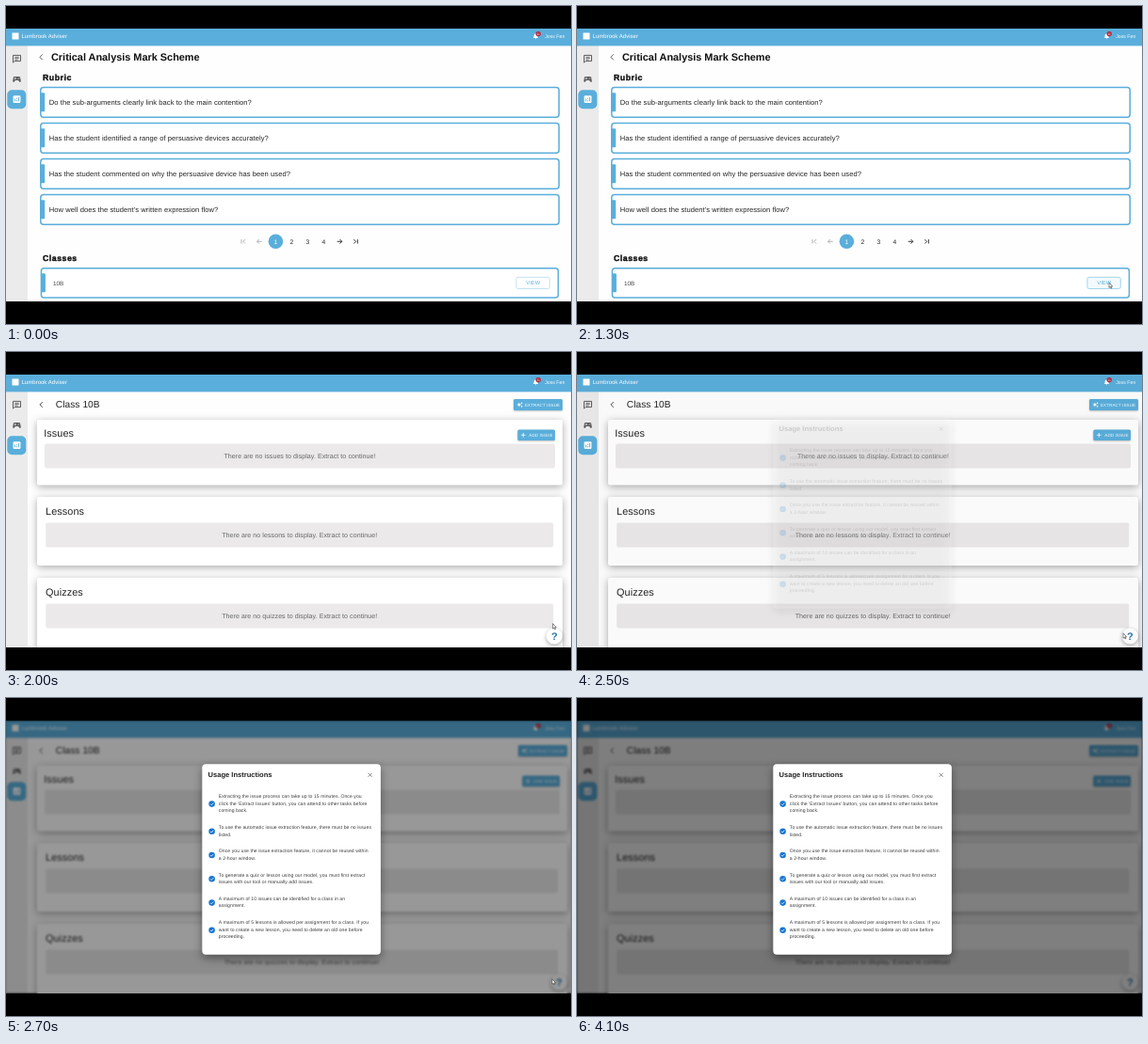
Animation of 600x338 px, one loop 5200 ms. Source, as an HTML page with a canvas:

```html
<!DOCTYPE html>
<html lang="en">
<head>
<meta charset="utf-8">
<title>Class assignment demo</title>
<style>
  html, body { margin: 0; width: 100%; height: 100%; overflow: hidden; background: #000; }
  canvas { display: block; width: 600px; height: 338px; }
</style>
</head>
<body>
<canvas id="stage"></canvas>
<script>
const W = 600, H = 338, LOOP = 5200, STEP = 100;
const TOP = 24, BOTTOM = 314;
const BLUE = '#5aaedb', INK = '#222';
const SANS = '"Liberation Sans", Arial, sans-serif';
const T = { load: 1400, ready: 1700, dialog: 2500, blur: 2700 };

const dpr = window.devicePixelRatio || 1;
function prepare(canvas) {
  canvas.width = W * dpr;
  canvas.height = H * dpr;
  return canvas.getContext('2d');
}
const stage = prepare(document.getElementById('stage'));
const layer = document.createElement('canvas');
const page = prepare(layer);
let c = page;

const clamp = v => Math.max(0, Math.min(1, v));
const ease = v => v * v * (3 - 2 * v);

function text(str, x, y, size, o = {}) {
  c.font = `${o.weight || 400} ${size}px ${SANS}`;
  c.textRendering = 'geometricPrecision';
  c.letterSpacing = (o.space || 0) + 'px';
  c.textAlign = o.align || 'left';
  c.fillStyle = o.color || INK;
  c.fillText(str, x, y);
  if (o.heavy) {
    c.strokeStyle = c.fillStyle;
    c.lineWidth = o.heavy;
    c.strokeText(str, x, y);
  }
}

function box(x, y, w, h, r, fill, stroke, line = 1) {
  c.beginPath();
  c.roundRect(x, y, w, h, r);
  if (fill) { c.fillStyle = fill; c.fill(); }
  if (stroke) { c.strokeStyle = stroke; c.lineWidth = line; c.stroke(); }
}

function disc(x, y, r, fill) {
  c.beginPath();
  c.arc(x, y, r, 0, Math.PI * 2);
  c.fillStyle = fill;
  c.fill();
}

// d is SVG path data relative to (x, y)
function path(x, y, d, stroke, line = 1, fill) {
  const p = new Path2D(d);
  c.save();
  c.translate(x, y);
  if (fill) { c.fillStyle = fill; c.fill(p); }
  if (stroke) { c.strokeStyle = stroke; c.lineWidth = line; c.stroke(p); }
  c.restore();
}

function shadowed(blur, dy, color, draw) {
  c.save();
  c.shadowColor = color;
  c.shadowBlur = blur * dpr;
  c.shadowOffsetY = dy * dpr;
  draw();
  c.restore();
}

function bell(x, y) {
  path(x, y, 'M-2.6 1.9V1.5L-1.9 .8V-.8Q-1.8 -2.3 -.4 -2.6Q0 -3.4 .4 -2.6Q1.8 -2.3 1.9 -.8V.8L2.6 1.5V1.9ZM-.7 2.3H.7Q.5 3.1 0 3.1Q-.5 3.1 -.7 2.3Z', null, 0, '#fff');
}

function frameUi(loading) {
  c.fillStyle = '#fefefe';
  c.fillRect(0, TOP, W, BOTTOM - TOP);
  c.fillStyle = '#ebebeb';
  c.fillRect(0, 42, 23, BOTTOM - 42);
  c.fillStyle = BLUE;
  c.fillRect(0, TOP, W, 18.4);

  box(6.5, 28.5, 7, 7, 0, '#fff');
  text('Lumbrook Adviser', 16.5, 34.2, 6.05, { color: '#fff' });
  text(loading ? 'Name' : 'Joss Fen', 593.3, 33.8, 5.2, { color: '#fff', align: 'right' });
  bell(loading ? 571 : 562.5, 32.2);
  if (!loading) {
    disc(565.2, 29.6, 2.7, '#b3263a');
    text('11', 565.2, 30.9, 3.4, { color: '#fff', align: 'center' });
  }

  const gray = '#5c5c5c';
  path(11.5, 56, 'M-4 -3.6H4V2.6H-2.4L-4 4.2Z', gray, 1);
  path(11.5, 56, 'M-2.2 -1.7H2.2M-2.2 -.3H2.2M-2.2 1.1H1', gray, .8);
  path(11.5, 77.8, 'M-2.6 -2.9H2.6Q3.4 -2.9 3.6 -2L4.3 2Q4.3 3.2 3.2 3.1L1.5 1.2H-1.5L-3.2 3.1Q-4.3 3.2 -4.3 2L-3.6 -2Q-3.4 -2.9 -2.6 -2.9Z', null, 0, gray);
  path(11.5, 77.8, 'M-2.8 -.8H-.6M-1.7 -1.9V.3M1 -.3H1.9M2 -1.4H2.9', '#ebebeb', .7);

  box(1.3, 89.3, 20, 20, 5, BLUE);
  box(7.6, 95.3, 7.8, 7.8, 1, '#fff');
  path(11.5, 99.2, 'M-2 2.2V-.6M0 2.2V.8M0 -.4V-1.4M2 2.2V-2.2', BLUE, .9);
}

function back(y) {
  path(37.4, y, 'M1.4 -2.9L-1.5 0L1.4 2.9', '#444', .9);
}

function markScheme(hover) {
  back(54.4);
  text('Critical Analysis Mark Scheme', 48, 58, 10.9, { weight: 700, color: '#111' });
  const black = { weight: 700, space: .55, heavy: .4, color: '#111' };
  text('Rubric', 39, 79, 8.7, black);
  text('Classes', 39, 271.2, 8.7, black);

  [
    'Do the sub-arguments clearly link back to the main contention?',
    'Has the student identified a range of persuasive devices accurately?',
    'Has the student commented on why the persuasive device has been used?',
    "How well does the student's written expression flow?"
  ].forEach((line, i) => {
    const y = 86.6 + i * 38;
    box(36.8, y, 550.4, 31.6, 3, '#fff', BLUE, 1.5);
    box(36.3, y + 5.6, 4.9, 20, 1, BLUE);
    text(line, 45.8, y + 17.9, 7.55, { space: .07 });
  });

  const pager = (i, d, color) => path(252 + i * 17.05, 250.3, d, color, .9);
  pager(0, 'M-2 -2.2V2.2M2 -2.2L-.2 0L2 2.2', '#aaa');
  pager(1, 'M2.6 0H-2.4M-.2 -2.3L-2.5 0L-.2 2.3', '#aaa');
  disc(286.4, 250.2, 7.8, BLUE);
  for (let n = 1; n <= 4; n++) {
    text(n, 269.2 + n * 17.05, 252.7, 6.7, { align: 'center', color: n === 1 ? '#fff' : INK });
  }
  pager(6, 'M-2.6 0H2.4M.2 -2.3L2.5 0L.2 2.3', '#222');
  pager(7, 'M2 -2.2V2.2M-2 -2.2L.2 0L-2 2.2', '#222');

  box(37.4, 278.7, 549, 31.2, 3, '#fff', BLUE, 1.5);
  box(37, 284.2, 4.9, 20, 1, BLUE);
  text('10B', 50, 296.6, 6.3, { color: '#444' });
  box(541.9, 288.3, 35.4, 12.2, 2, hover ? '#f3fafd' : '#fff', hover ? '#8ecbe9' : '#b4daee', .8);
  text('VIEW', 559.7, 296.4, 5.7, { align: 'center', color: BLUE, space: .1 });
}

function loadingPage(t) {
  back(56);
  text('Class Assignment Details', 52.8, 59.4, 10.15, { space: .075 });
  const age = (t - 1500) / 1400;
  if (age >= 0) {
    const start = age * Math.PI * 2;
    c.beginPath();
    c.arc(311.5, 222, 6.5, start, start + .12 + 5 * ease(clamp(age * 2)));
    c.strokeStyle = '#9cb6cc';
    c.lineWidth = 1;
    c.stroke();
  }
}

function button(x, y, w, h, label) {
  shadowed(2, 1, 'rgba(0,0,0,.25)', () => box(x, y, w, h, 1.5, BLUE));
  text(label, x + 12, y + h / 2 + 1.7, 4.5, { color: '#fff', space: .11 });
}

// extra is the room gained when the scrollbar is hidden
function classPage(extra) {
  back(56);
  text('Class 10B', 52.8, 59.4, 10.15, { space: .075 });
  button(539 + extra, 50, 52, 12, 'EXTRACT ISSUE');
  path(545.5 + extra, 56, 'M-.6 -2.6L.1 -.7L2 0L.1 .7L-.6 2.6L-1.3 .7L-3.2 0L-1.3 -.7ZM2.2 -3L2.6 -2L3.5 -1.7L2.6 -1.3L2.2 -.4L1.8 -1.3L.9 -1.7L1.8 -2ZM2.2 .6L2.6 1.5L3.5 1.9L2.6 2.2L2.2 3.1L1.8 2.2L.9 1.9L1.8 1.5Z', null, 0, '#fff');

  [
    ['Issues', 72, 69.5, 40.2, 41, 583, 97.6, 89.5],
    ['Lessons', 154, 73, 42.1, 42.2, 581.3, 181.6, 173.4],
    ['Quizzes', 240, 90, 42.1, 42.2, 581.3, 267.4, 259]
  ].forEach(([name, y, h, tx, left, right, by, base]) => {
    shadowed(8, 2, 'rgba(0,0,0,.34)', () => box(33, y, 558 + extra, h, 2, '#fff'));
    text(name, tx, base, 10.85, { space: .08 });
    box(left, by, right - left + extra, 26, 2, '#ebe9ea');
    text(`There are no ${name.toLowerCase()} to display. Extract to continue!`,
      (left + right + extra) / 2, by + 15.4, 7.06, { align: 'center', color: '#666', space: .066 });
  });

  button(543.3 + extra, 82.5, 39.7, 11.6, 'ADD ISSUE');
  path(549.3 + extra, 88.3, 'M-2.3 0H2.3M0 -2.3V2.3', '#fff', .8);
}

function helpButton(extra) {
  const x = 582.3 + extra;
  shadowed(4, 1.5, 'rgba(0,0,0,.35)', () => disc(x, 302, 8.6, '#fff'));
  text('?', x, 306, 11, { weight: 700, align: 'center', color: '#2b73a8' });
}

// first baseline, tick position, lines
const NOTES = [
  [106.2, 112.6, 'Extracting the issue process can take up to 15 minutes. Once you', "click the 'Extract Issues' button, you can attend to other tasks before", 'coming back.'],
  [139.1, 141.8, 'To use the automatic issue extraction feature, there must be no issues', 'listed.'],
  [164.3, 167, 'Once you use the issue extraction feature, it cannot be reused within', 'a 2-hour window.'],
  [189.5, 192.3, 'To generate a quiz or lesson using our model, you must first extract', 'issues with our tool or manually add issues.'],
  [214.8, 217.6, 'A maximum of 10 issues can be identified for a class in an', 'assignment.'],
  [240.2, 246.8, 'A maximum of 5 lessons is allowed per assignment for a class. If you', 'want to create a new lesson, you need to delete an old one before', 'proceeding.']
];

function dialog() {
  shadowed(10, 4, 'rgba(0,0,0,.4)', () => box(208.3, 70.2, 189.6, 202.6, 4, '#fff'));
  text('Usage Instructions', 214.6, 84.3, 7.55, { weight: 700 });
  path(386.6, 81.8, 'M-2 -2L2 2M2 -2L-2 2', '#666', .8);
  for (const [base, tickY, ...lines] of NOTES) {
    disc(218.6, tickY, 3.3, '#1976d2');
    path(218.6, tickY, 'M-1.6 .1L-.5 1.2L1.7 -1.1', '#fff', .75);
    lines.forEach((line, i) => text(line, 225.8, base + i * 7.5, 5.12, { space: .053, color: '#3c3c3c' }));
  }
}

// time, x, y
const MOVES = [
  [200, 591, 240], [600, 578, 287], [800, 576, 293], [1100, 570, 294],
  [1300, 565, 294], [1500, 561.5, 295], [1800, 567, 294], [2000, 580.7, 288.7],
  [2300, 580, 298.8], [3300, 580, 298.8], [3500, 579.3, 298.4],
  [3700, 579.3, 298.4], [4100, 552, 241]
];

function cursor(t) {
  const i = MOVES.findIndex(m => m[0] > t);
  if (i < 1) return;
  const [t0, x0, y0] = MOVES[i - 1], [t1, x1, y1] = MOVES[i];
  const k = ease((t - t0) / (t1 - t0));
  path(x0 + (x1 - x0) * k, y0 + (y1 - y0) * k,
    'M0 0V5.4L1.2 4.3L2 6.1L2.9 5.7L2.1 4H3.7Z', '#333', .6, '#fff');
}

function drawPage(t) {
  const extra = t >= T.dialog ? 5 : 0;
  const loading = t >= T.load && t < T.ready;
  frameUi(loading);
  if (t < T.load) return markScheme(t >= 700);
  if (loading) loadingPage(t);
  else classPage(extra);
  helpButton(extra);
}

function render(t) {
  c = page;
  c.setTransform(dpr, 0, 0, dpr, 0, 0);
  c.fillStyle = '#000';
  c.fillRect(0, 0, W, H);
  drawPage(t);

  c = stage;
  c.setTransform(dpr, 0, 0, dpr, 0, 0);
  c.filter = t >= T.blur ? `blur(${.8 * dpr}px)` : 'none';
  c.drawImage(layer, 0, 0, W, H);
  c.filter = 'none';

  if (t >= T.dialog) {
    // the backdrop darkens more slowly than the dialog appears
    const age = t - T.dialog;
    c.fillStyle = `rgba(0,0,0,${.5 * clamp((age + 10) / 260)})`;
    c.fillRect(0, TOP, W, BOTTOM - TOP);
    c.globalAlpha = clamp((age + 20) / 120);
    dialog();
    c.globalAlpha = 1;
  }

  cursor(t);
  c.fillStyle = '#000';
  c.fillRect(0, 0, W, TOP);
  c.fillRect(0, BOTTOM, W, H - BOTTOM);
}

const begin = performance.now();
let last = -1;
function tick() {
  const t = Math.floor((performance.now() - begin) % LOOP / STEP) * STEP;
  if (t !== last) render(last = t);
  requestAnimationFrame(tick);
}
tick();
</script>
</body>
</html>
```
